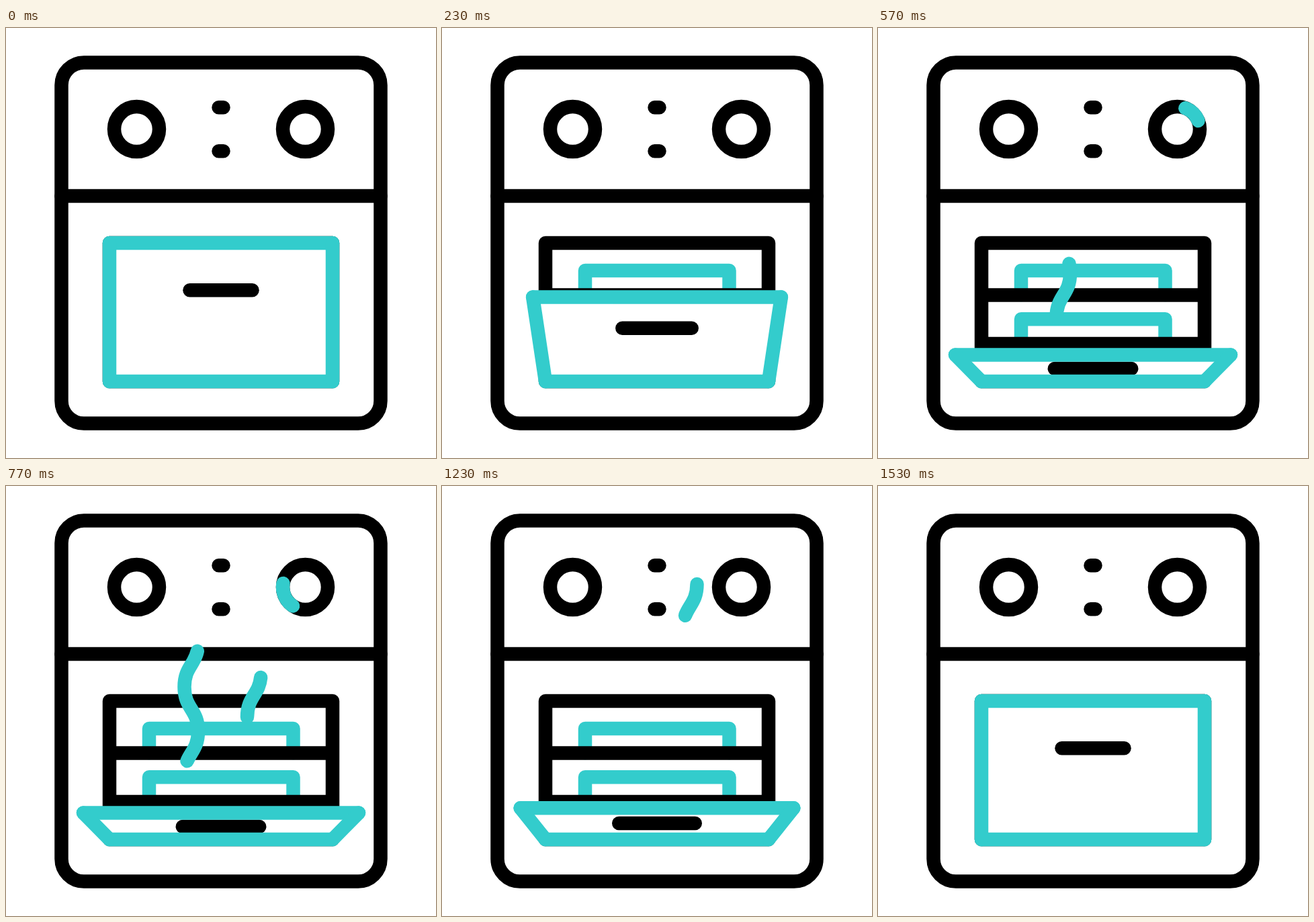
An HTML page without scripts that plays this animation: 640 by 640 pixels, repeating every 1.67 s.

```html
<!DOCTYPE html>
<html lang="en">
<head>
<meta charset="utf-8">
<title>Oven</title>
<style>
  /* clock: 50 ticks per loop, everything else is computed from it */
  @property --t { syntax: "<number>"; inherits: true; initial-value: 0; }
  @keyframes tick { to { --t: 50; } }

  html, body { margin: 0; width: 100%; height: 100%; overflow: hidden; background: #fff; }

  svg {
    display: block;
    width: 640px;
    height: 640px;
    fill: none;
    stroke: #000;
    stroke-width: 20.5;
    stroke-linecap: round;
    stroke-linejoin: round;
    animation: tick 1670ms steps(50) -8ms infinite;
  }

  .teal { stroke: #33cccc; }

  /* door: --p runs from 0 (closed) to 1 (open) */
  .door {
    --u: clamp(0, (var(--t) - 2.5) / 9.2, 1);
    --v: clamp(0, (var(--t) - 35.8) / 9.6, 1);
    --p: calc(var(--u) * var(--u) * (3 - 2 * var(--u)) - var(--v) * var(--v) * (3 - 2 * var(--v)));
    --top: calc(320 + 166.5 * var(--p));
    --spread: calc(39 * var(--p));
  }
  .door line { vector-effect: non-scaling-stroke; }
  .panel {
    fill: #fff;
    stroke: none;
    clip-path: polygon(
      calc((154 - var(--spread)) * 1px) calc(var(--top) * 1px),
      calc((486 + var(--spread)) * 1px) calc(var(--top) * 1px),
      486px 526px, 154px 526px);
  }
  .handle { transform: matrix(calc(46.5 + 10.7 * var(--p)), 0, 0, 1, 320, calc(390.3 + 116.7 * var(--p))); }
  .rim { transform: matrix(calc(166 + var(--spread)), 0, 0, 1, 320, var(--top)); }
  .left { transform: matrix(1, 0, calc(-1 * var(--spread)), calc(var(--top) - 526), 154, 526); }
  .right { transform: matrix(1, 0, var(--spread), calc(var(--top) - 526), 486, 526); }

  /* trail: head leaves at tick --a, tail follows at tick --b */
  .trail {
    --u: clamp(0, (var(--t) - var(--a)) / 14.4, 1);
    --v: clamp(0, (var(--t) - var(--b)) / 14.4, 1);
    --head: calc(var(--u) * var(--u) * (3 - 2 * var(--u)));
    --tail: calc(var(--v) * var(--v) * (3 - 2 * var(--v)));
    --len: calc(var(--head) - var(--tail));
    stroke-dasharray: calc(var(--len) * 100px) 200px;
    stroke-dashoffset: calc(var(--tail) * -100px);
    opacity: calc(var(--len) * 9999);
  }
</style>
</head>
<body>
<svg viewBox="0 0 640 640">
  <rect x="82.5" y="51.5" width="475" height="537" rx="33.5"/>
  <path d="M82.5 250H557.5M316.5 118.3h7M316.5 183.3h7"/>
  <circle cx="194.5" cy="150.6" r="33.5"/>
  <circle cx="445.5" cy="150.6" r="33.5"/>

  <path class="teal" d="M213 397V361H427.5V397M213 470V433.3H427.5V470"/>
  <path d="M154 320H486V526H154ZM154 397.5H486M154 470H486"/>

  <g class="door">
    <rect class="panel" width="640" height="640"/>
    <line class="handle" x1="-1" x2="1"/>
    <g class="teal">
      <path d="M154 526H486"/>
      <line class="rim" x1="-1" x2="1"/>
      <line class="left" y2="1"/>
      <line class="right" y2="1"/>
    </g>
  </g>

  <g class="teal">
    <path class="trail" style="--a:13;--b:14.9" pathLength="100"
      d="M445.5 117.1a33.5 33.5 0 0 1 0 67a33.5 33.5 0 0 1 0-67"/>
    <path class="trail" style="--a:10.76;--b:20.1" pathLength="100"
      d="M265.5 431c0-33 20.5-33 20.5-66s-20.5-33-20.5-66s20.5-33 20.5-66"/>
    <path class="trail" style="--a:17.75;--b:27.2" pathLength="100"
      d="M359 344c0-33 20.5-33 20.5-66s-20.5-33-20.5-66s20.5-33 20.5-66"/>
  </g>
</svg>
</body>
</html>
```
